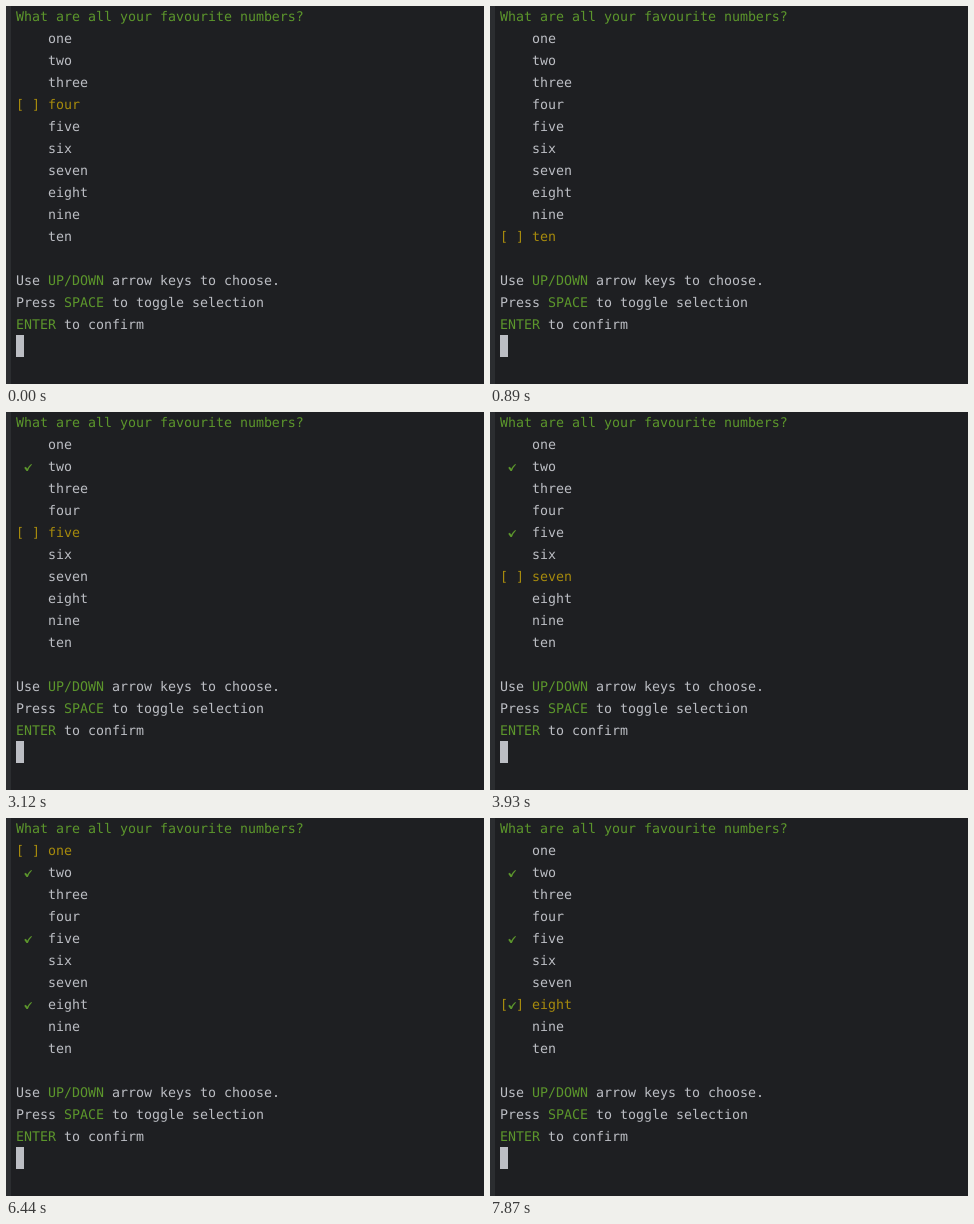
These frames come from a looping animation (478 px wide and 378 px high, 8 s). An HTML page:

```html
<!DOCTYPE html>
<html lang="en">
<head>
<meta charset="utf-8">
<title>Multiple choice prompt</title>
<style>
  html, body { margin: 0; width: 100%; height: 100%; overflow: hidden; background: #1e1f22; }
  svg { display: block; }
  text {
    font: 13.29px "DejaVu Sans Mono", "Noto Sans Mono", monospace;
    text-rendering: geometricPrecision;
    white-space: pre;
  }
</style>
</head>
<body>
<svg id="stage" width="478" height="378" viewBox="0 0 478 378">
  <rect width="478" height="378" fill="#1e1f22"/>
  <rect width="5" height="378" fill="#2b2d30"/>
</svg>
<script>
const LOOP = 8000;
const PLAIN = '#bcbec4', GREEN = '#5c962c', YELLOW = '#a68a0d';
const LEFT = 10, CELL = 8, LINE = 22, BASE = 15;
const WORDS = 'one two three four five six seven eight nine ten'.split(' ');

// Each key press moves the selection down one row, wrapping at the end.
const START = 3;
const MOVES = [80, 350, 530, 620, 710, 890, 1160, 1870, 2670, 2850, 3120,
  3750, 3930, 4110, 5910, 6170, 6440, 6800, 6924, 7048, 7172, 7296, 7420, 7870];
const CHECKED_AT = { two: 2400, five: 3480, eight: 4650 };
const CURSOR_OFF = [[1600, 1870], [5190, 5640]];
const REDRAW = [620, 710];

const stage = document.getElementById('stage');
const within = (t, [from, to]) => t >= from && t < to;
const show = (node, on) => node.setAttribute('visibility', on ? 'visible' : 'hidden');

function add(parent, tag, attrs) {
  const node = document.createElementNS('http://www.w3.org/2000/svg', tag);
  for (const key in attrs) node.setAttribute(key, attrs[key]);
  return parent.appendChild(node);
}

function write(parent, col, row, text, fill = PLAIN) {
  const node = add(parent, 'text', { x: LEFT + col * CELL, y: BASE + row * LINE, fill });
  node.textContent = text;
  return node;
}

write(stage, 0, 0, 'What are all your favourite numbers?', GREEN);

const rows = WORDS.map((word, i) => {
  const row = i + 1;
  const brackets = add(stage, 'g', {});
  write(brackets, 0, row, '[', YELLOW);
  write(brackets, 2, row, ']', YELLOW);
  const check = add(stage, 'path', {
    d: 'M.2-3.2L1.9-4.2L3.2-2.3Q4.9-5.4 7.2-7L8-6.6Q5.3-3.9 3.9 0H2.5Z',
    transform: `translate(${LEFT + CELL} ${BASE + row * LINE})`,
    fill: GREEN
  });
  return { brackets, check, label: write(stage, 4, row, word), checkedAt: CHECKED_AT[word] ?? Infinity };
});

const help = add(stage, 'g', {});
write(help, 0, 12, 'Use');
write(help, 4, 12, 'UP/DOWN', GREEN);
write(help, 12, 12, 'arrow keys to choose.');
write(help, 0, 13, 'Press');
write(help, 6, 13, 'SPACE', GREEN);
write(help, 12, 13, 'to toggle selection');
write(help, 0, 14, 'ENTER', GREEN);
write(help, 6, 14, 'to confirm');

const cursor = add(stage, 'rect', { x: LEFT, width: CELL, height: LINE, fill: PLAIN });

function draw(t) {
  const selected = (START + MOVES.filter(at => at <= t).length) % WORDS.length;
  const redrawing = within(t, REDRAW);
  rows.forEach((row, i) => {
    show(row.brackets, i === selected);
    show(row.check, t >= row.checkedAt);
    row.label.setAttribute('fill', i === selected ? YELLOW : PLAIN);
  });
  show(help, !redrawing);
  show(cursor, !CURSOR_OFF.some(span => within(t, span)));
  cursor.setAttribute('y', (redrawing ? 10 : 15) * LINE - 1);
}

function tick() {
  draw(performance.now() % LOOP);
  requestAnimationFrame(tick);
}
tick();
</script>
</body>
</html>
```
